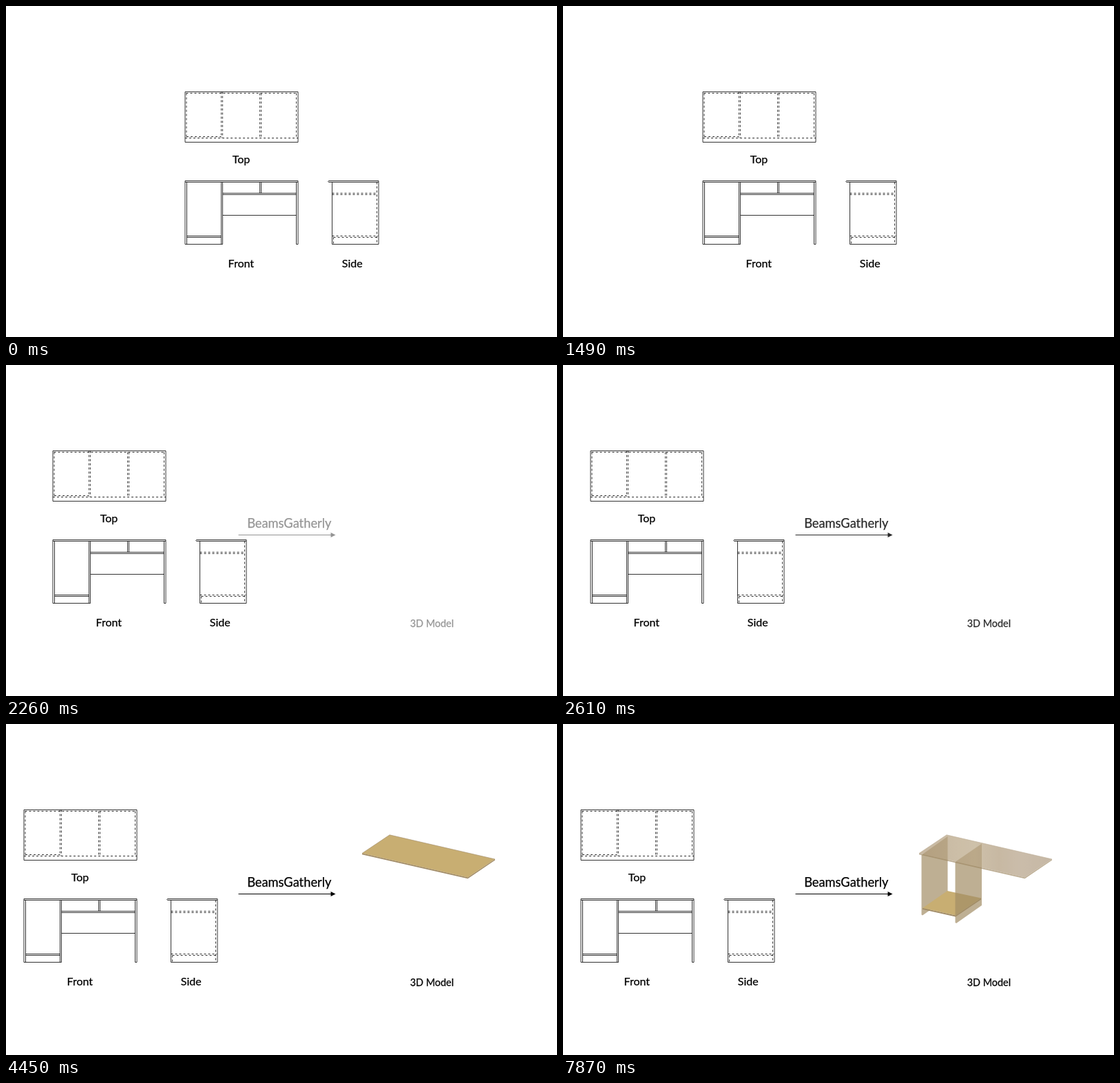
An HTML page for the animation above (8 s loop, 800 by 480 pixels).

```html
<!DOCTYPE html>
<html lang="en">
<head>
<meta charset="utf-8">
<title>Drawing to model</title>
<style>
  html, body { margin: 0; height: 100%; overflow: hidden; background: #fff; }
  svg { display: block; width: 800px; height: 480px; }
  text { font-family: Lato, Inter, sans-serif; font-size: 16px; text-anchor: middle; stroke: #000; stroke-width: .25; }
  .lines { fill: none; stroke: #000; stroke-width: .8; }
  .dashed { stroke-dasharray: 3 3; }
  .plank { visibility: hidden; opacity: .7; }
  .plank.shown { visibility: visible; }
  .plank.fresh { opacity: 1; }
  .face { fill: #a38d65; }
  .deck { fill: url(#grain); }
  .fresh .deck { fill: #c8ae72; }
  .rim { fill: #9f8964; }
</style>
</head>
<body>
<svg viewBox="0 0 800 480">
  <defs>
    <linearGradient id="grain">
      <stop offset="0" stop-color="#b09a79"/>
      <stop offset=".42" stop-color="#baa786"/>
      <stop offset=".6" stop-color="#b09b7c"/>
      <stop offset=".75" stop-color="#b5a187"/>
      <stop offset="1" stop-color="#ae9a7f"/>
    </linearGradient>
  </defs>

  <g id="views">
    <g class="lines" transform="translate(.5 .5)">
      <!-- top view -->
      <path d="M259.5 124H423.5V197H259.5Z"/>
      <path class="dashed" d="M261 126H421M259.5 191H423.5M261.5 189H312M261.5 126V189M312 124V191M314 124V191M368 126V191M370 126V191M421 126V191"/>
      <!-- front view -->
      <path d="M259.5 253H423.5V255H259.5ZM259.5 255V345H314V255M262 255V345M312 255V345M262 333H312M262 335H312M314 271H421M314 273H421M368 255V271M370 255V271M314 303H421M421 255V345H423.5V255"/>
      <!-- side view -->
      <path d="M468 253H540.5V255H468Q466.5 254 468 253M473 255V345H540.5V255"/>
      <path class="dashed" d="M538 255V345M473 271H538M473 273H538M473 333H540M475 335H538M475 335V345"/>
    </g>
    <text x="341.5" y="228">Top</text>
    <text x="341.3" y="379">Front</text>
    <text x="502.8" y="379">Side</text>
  </g>

  <g id="result">
    <text x="411.3" y="236" style="font-size:18.3px">BeamsGatherly</text>
    <path d="M337.5 246.5H473" stroke="#000"/>
    <path d="M471.5 243L478.5 246.5L471.5 250Z"/>
    <text x="618.4" y="380" style="font-size:14.4px">3D Model</text>
  </g>

  <!-- planks from back to front; data-at is the time each one is added -->
  <g class="plank" data-at="5590">
    <path class="face" d="M520.5 190L558.5 163V252L522 277.5L520.5 276.5Z"/>
  </g>
  <g class="plank" data-at="7870">
    <path class="deck" d="M522 267L558 242L607 252.5L570 277.5Z"/>
    <path class="rim" d="M522 267L570 277.5L607 252.5V254.5L570 279.5L522 268.8Z"/>
  </g>
  <g class="plank" data-at="6730">
    <path class="face" d="M569.5 200L608 173.5V263L571 289L569.5 288Z"/>
  </g>
  <g class="plank" data-at="4450">
    <path class="deck" d="M517 187.5L557 160.8L710 196L670.5 222.5Z"/>
    <path class="rim" d="M517 187.5L670.5 222.5L710 196V197.5L670.5 224.3L517 189.3Z"/>
    <path d="M517 187.5L557 160.8L710 196" fill="none" stroke="#a08b69" stroke-opacity=".6"/>
  </g>
</svg>

<script>
const LOOP = 8000, STEP = 70, SLIDE_STEPS = 30, SLIDE = 234;
const FADE_FROM = 12, FADE_STEPS = 12, MOVE_START = 1140;
const views = document.getElementById('views');
const result = document.getElementById('result');
const planks = [...document.querySelectorAll('.plank')];
const clamp = v => Math.min(1, Math.max(0, v));

const bezier = (a, b, p) => 3 * a * p * (1 - p) ** 2 + 3 * b * p * p * (1 - p) + p ** 3;

// Cubic easing, solved by bisection
function ease(x) {
  let low = 0, high = 1;
  for (let i = 0; i < 24; i++) {
    const mid = (low + high) / 2;
    if (bezier(.26, .355, mid) < x) low = mid; else high = mid;
  }
  return bezier(.1, 1, high);
}

function draw(t) {
  const step = Math.floor((t - MOVE_START) / STEP) + 1;
  const shift = Math.round(SLIDE * ease(clamp(step / SLIDE_STEPS)));
  views.setAttribute('transform', `translate(${-shift} 0)`);
  result.setAttribute('opacity', clamp((step - FADE_FROM) / FADE_STEPS));

  const newest = Math.max(...planks.map(p => +p.dataset.at).filter(at => at <= t));
  for (const plank of planks) {
    const at = +plank.dataset.at;
    plank.classList.toggle('shown', at <= t);
    plank.classList.toggle('fresh', at === newest);
  }
}

const start = performance.now();
function tick() {
  draw((performance.now() - start) % LOOP);
  requestAnimationFrame(tick);
}
tick();
</script>
</body>
</html>
```
